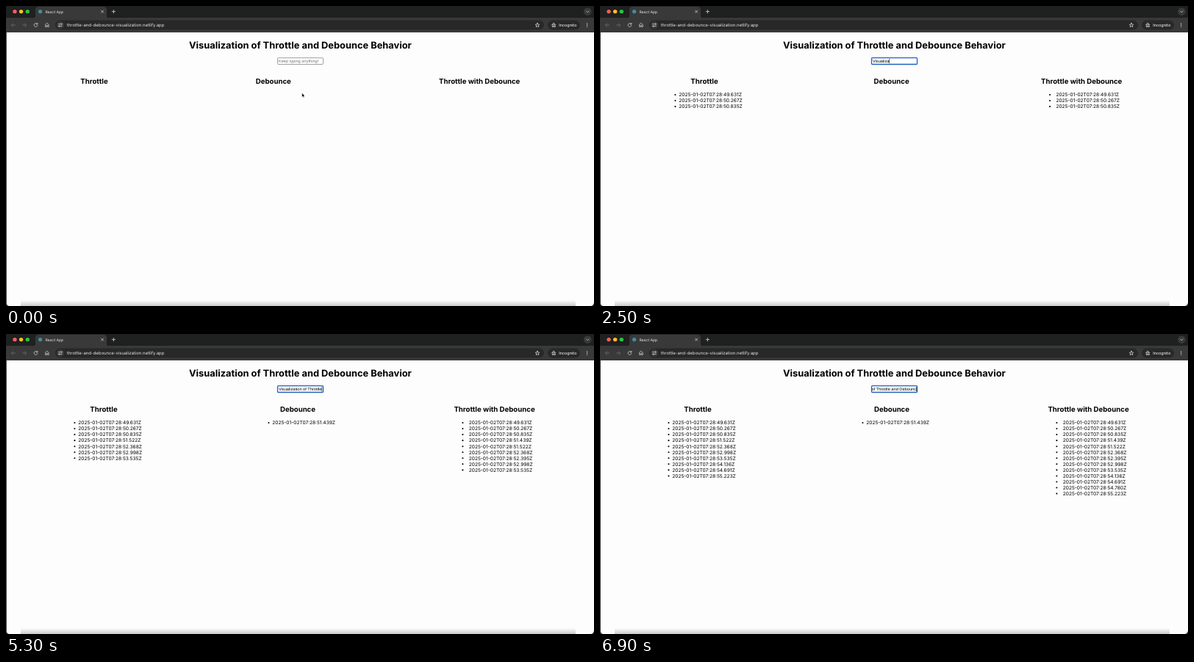
Write an HTML page that moves like this. It is 800 px wide and 409 px high and loops after 7000 ms.

```html
<!DOCTYPE html>
<html lang="en">
<head>
<meta charset="utf-8">
<title>Throttle and debounce</title>
<style>
  html, body { margin: 0; width: 100%; height: 100%; overflow: hidden; background: #fdfdfd; }
  svg { display: block; }
  text { font-family: Inter, "Open Sans", sans-serif; text-rendering: geometricPrecision; white-space: pre; }
  .h1 { font-size: 12.85px; font-weight: 700; text-anchor: middle; }
  .h2 { font-size: 9.65px; font-weight: 700; text-anchor: middle; }
  .item { font-size: 6.6px; }
  .field { font: 5.66px "Liberation Sans", Arial, sans-serif; }
  .icon { fill: none; stroke: #d2d2d2; stroke-width: .8; stroke-linecap: round; stroke-linejoin: round; }
  .off { stroke: #6c6c6c; }
  .light { fill: #e6e6e6; }
</style>
</head>
<body>
<svg width="800" height="409" viewBox="0 0 800 409">
  <defs>
    <linearGradient id="shade" x2="0" y2="1">
      <stop offset="0" stop-color="#000" stop-opacity="0"/>
      <stop offset="1" stop-color="#000" stop-opacity=".2"/>
    </linearGradient>
  </defs>
  <rect width="800" height="409" fill="#fdfdfd"/>

  <!-- tab strip -->
  <rect width="800" height="17" fill="#1f2020"/>
  <path d="M36 17q4 0 4-4V5q0-4 4-4h89q4 0 4 4v8q0 4 4 4z" fill="#393939"/>
  <circle cx="12" cy="7.6" r="2.7" fill="#fe5f57"/>
  <circle cx="20.6" cy="7.6" r="2.7" fill="#febc2e"/>
  <circle cx="29.3" cy="7.6" r="2.7" fill="#28c840"/>
  <circle cx="46.6" cy="7.6" r="2.6" fill="#3f8ea3"/>
  <text class="light" x="53.4" y="9.5" font-size="5.1">React App</text>
  <path class="icon" d="M129.6 6.1l3 3m0-3l-3 3M144.2 7.6h4.4m-2.2-2.2v4.4"/>
  <circle cx="791.3" cy="7.6" r="5.3" fill="#393939"/>
  <path class="icon" d="M789.5 6.9l1.8 1.8 1.8-1.8"/>

  <!-- toolbar -->
  <rect y="16" width="800" height="20" fill="#393939"/>
  <rect x="67" y="19.5" width="665" height="13" rx="6.5" fill="#282828"/>
  <rect x="737" y="19.5" width="44" height="13" rx="6.5" fill="#282828"/>
  <path class="icon off" d="M12.5 26h-5m2.3-2.3L7.5 26l2.3 2.3M22.5 26h5m-2.3-2.3l2.3 2.3-2.3 2.3"/>
  <path class="icon" d="M42.6 24.6a2.4 2.4 0 1 0 .3 2M42.9 23.3v1.6h-1.6"/>
  <path class="icon" d="M53.7 25.4v3h1.5v-1.8h1.5v1.8h1.5v-3l-2.3-1.9z"/>
  <circle cx="74" cy="26" r="5" fill="#3c3c3c"/>
  <path class="icon" d="M71.6 24.6h2.2m-.2 2.8h2.6"/>
  <circle class="icon" cx="75.4" cy="24.6" r=".8"/>
  <circle class="icon" cx="72.4" cy="27.4" r=".8"/>
  <text class="light" x="82.8" y="28.1" font-size="5.95">throttle-and-debounce-visualization.netlify.app</text>
  <path class="icon" d="M723 23.2l.8 1.9 2 .2-1.5 1.3.5 2-1.8-1.1-1.8 1.1.5-2-1.5-1.3 2-.2z" stroke-width=".7"/>
  <path class="icon" d="M742.6 25.6h5.2m-4-.4l.5-1.8h1.8l.5 1.8"/>
  <circle class="icon" cx="743.9" cy="27.8" r=".9"/>
  <circle class="icon" cx="746.5" cy="27.8" r=".9"/>
  <text class="light" x="752.2" y="28" font-size="5.45" font-weight="500">Incognito</text>
  <g class="light">
    <circle cx="790.6" cy="23.9" r=".65"/><circle cx="790.6" cy="26" r=".65"/><circle cx="790.6" cy="28.1" r=".65"/>
  </g>

  <!-- page -->
  <text class="h1" x="400.4" y="58.1">Visualization of Throttle and Debounce Behavior</text>
  <rect id="box" x="369.5" y="70.7" width="62" height="8.8" rx="1" fill="#fff"/>
  <svg x="370" y="71" width="61" height="8.4">
    <text id="typed" class="field" y="6"/>
    <rect id="caret" y="1" width=".6" height="6.2"/>
  </svg>
  <g id="columns"></g>
  <rect x="20" y="401" width="755" height="8" fill="url(#shade)"/>
  <path d="M0 36h.8v369q0 3.2 3.2 4H0zM800 405v4h-4q3.2-.8 4-4z" fill="#23272c"/>
  <g id="mouse">
    <path id="arrow" d="M0 0v5.7l1.3-1.2.9 2 1-.4-.9-2H4z" stroke="#fff" stroke-width=".5"/>
    <path id="beam" d="M-1-3q1 0 1 .8v4.4q0 .8-1 .8M1-3q-1 0-1 .8v4.4q0 .8 1 .8" fill="none" stroke="#000" stroke-width=".6"/>
  </g>
</svg>
<script>
const LOOP = 7000, STEP = 100;
const CLOCK = 48520;  // clock milliseconds past 07:28 when the loop starts
const FOCUS = 700, TYPING = 1100, SETTLED = 2900;
const MESSAGE = "Visualization of Throttle and Debounc";
// key presses, in tenths of a second
const KEYS = [11, 12, 13, 15, 17, 19, 20, 22, 23, 30, 31, 32, 33, 34, 38, 40, 41, 43, 44,
  46, 47, 48, 50, 51, 52, 54, 55, 56, 57, 61, 62, 63, 64, 65, 67, 68, 69];

const throttled = [49631, 50267, 50835, 51522, 52368, 52998, 53535, 54136, 54691, 55223];
const debounced = [51439];
const both = [...throttled, 51439, 52395, 54780].sort((a, b) => a - b);

const $ = id => document.getElementById(id);
const show = (el, on) => el.setAttribute("visibility", on ? "visible" : "hidden");

function add(parent, tag, attrs, text = "") {
  const el = document.createElementNS("http://www.w3.org/2000/svg", tag);
  for (const name in attrs) el.setAttribute(name, attrs[name]);
  el.textContent = text;
  return parent.appendChild(el);
}

// centres: heading position when empty, while typing, and once every list has entries
function column(title, times, centres, bulletGap) {
  const g = add($("columns"), "g", {});
  add(g, "text", { class: "h2", x: 0, y: 106.4 }, title);
  const items = times.map((ms, i) => {
    const li = add(g, "g", { transform: `translate(-34.8 ${121 + 8.05 * i})` });
    add(li, "circle", { cx: -bulletGap, r: 1.05 });
    add(li, "text", { class: "item", y: 2.3 }, new Date(Date.UTC(2025, 0, 2, 7, 28) + ms).toISOString());
    return { li, at: Math.floor((ms - CLOCK) / STEP) * STEP };
  });
  return t => {
    const x = centres[t < TYPING ? 0 : t < SETTLED ? 1 : 2];
    g.setAttribute("transform", `translate(${x} 0)`);
    items.forEach(({ li, at }) => show(li, t >= at));
  };
}

const columns = [
  column("Throttle", throttled, [120, 142, 133], 4.8),
  column("Debounce", debounced, [363.8, 396.6, 397], 4.8),
  column("Throttle with Debounce", both, [644.2, 655.2, 664.5], 8.3),
];

function drawField(t) {
  const focused = t >= FOCUS;
  const text = MESSAGE.slice(0, KEYS.filter(k => k * 100 <= t).length);
  $("box").setAttribute("stroke", focused ? "#1f62c4" : "#767676");
  $("box").setAttribute("stroke-width", focused ? 1.3 : .7);
  const typed = $("typed");
  typed.textContent = text || "Keep typing anything!";
  typed.setAttribute("fill", text ? "#000" : "#757575");
  const width = text ? typed.getComputedTextLength() : 0;
  const x = Math.min(.9, 60 - width);
  typed.setAttribute("x", x);
  $("caret").setAttribute("x", x + width);
  show($("caret"), focused);
}

function drawMouse(t) {
  const p = Math.min(1, Math.max(0, (t - 50) / 500));
  const e = p * p * (3 - 2 * p);
  const x = 402.7 - 3 * e, y = 118.6 - 43.4 * e;
  const inside = y < 80;
  $("mouse").setAttribute("transform", `translate(${x} ${y})`);
  show($("arrow"), t < TYPING && !inside);
  show($("beam"), t < TYPING && inside);
}

function frame(now) {
  const t = Math.floor(now % LOOP / STEP) * STEP;
  columns.forEach(draw => draw(t));
  drawField(t);
  drawMouse(t);
  requestAnimationFrame(frame);
}
frame(performance.now());
</script>
</body>
</html>
```
